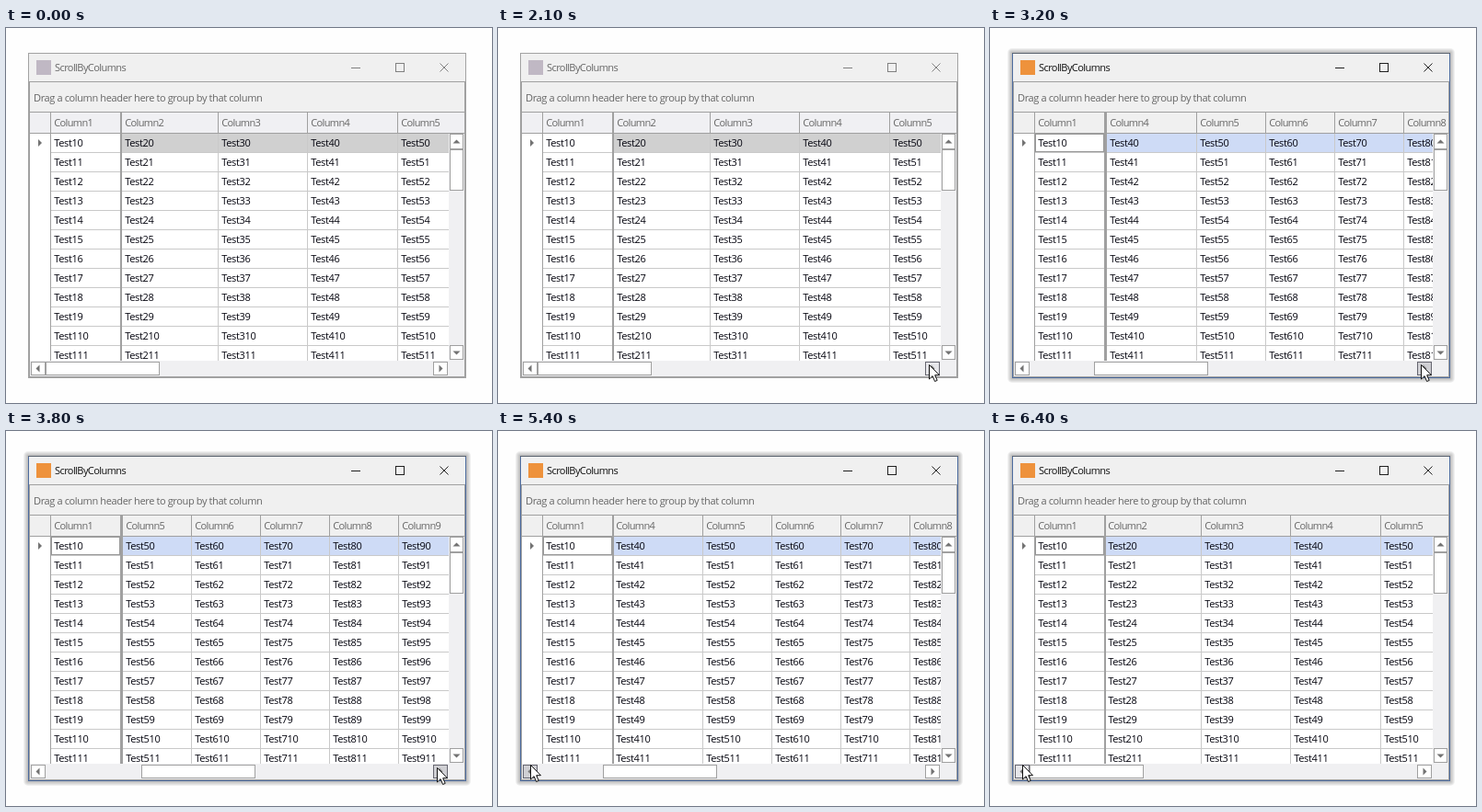
Animation, 528 px wide and 408 px high, one loop 8 s. Source, as an HTML page:

```html
<!DOCTYPE html>
<html lang="en">
<head>
<meta charset="utf-8">
<title>ScrollByColumns</title>
<style>
html, body { margin: 0; width: 100%; height: 100%; overflow: hidden; background: #fefefe; }
svg { display: block; }
text { font: 11px "Open Sans", "Noto Sans", sans-serif; white-space: pre; }
.cell { letter-spacing: -.3px; fill: #05050f; }
.head { letter-spacing: -.63px; fill: #666; }
.hint { letter-spacing: -.37px; fill: #666; }
.title { letter-spacing: -.57px; }
</style>
</head>
<body>
<svg id="stage" width="528" height="408" viewBox="0 0 528 408"></svg>
<script>
const LOOP = 8000, STEP = 100;
const LINE = '#a0a0a0', GRID = '#c9c9c9', FACE = '#f0f0f0';
const RIGHT_BUTTON = [468, 366], LEFT_BUTTON = [35, 363];

// time, first scrolled column, its left edge, thumb x, width of the fixed divider
const scrolls = [
  [0, 2, 125, 43, 2],
  [2600, 3, 126, 79, 3],
  [3200, 4, 126, 113, 3],
  [3800, 5, 126, 147, 3],
  [5400, 4, 124, 114, 2],
  [5900, 3, 124, 80, 2],
  [6300, 2, 124, 43, 2]
];

const stage = document.getElementById('stage');
const range = n => [...Array(n).keys()];
const colWidth = c => ({ 2: 105, 3: 97, 4: 98 })[c] || 75;

const rect = (x, y, w, h, fill) =>
  `<rect x="${x}" y="${y}" width="${w}" height="${h}" fill="${fill}"/>`;
const frame = (x, y, w, h, fill, stroke, extra = '') =>
  `<rect x="${x + .5}" y="${y + .5}" width="${w - 1}" height="${h - 1}" fill="${fill}" stroke="${stroke}" ${extra}/>`;
const path = (d, fill, stroke = 'none') => `<path d="${d}" fill="${fill}" stroke="${stroke}"/>`;
const label = (x, y, str, cls, fill) =>
  `<text x="${x}" y="${y}" class="${cls}"${fill ? ` style="fill:${fill}"` : ''}>${str}</text>`;

function ease(p) {
  const k = 2.6;
  return p < .5 ? Math.pow(2 * p, k) / 2 : 1 - Math.pow(2 - 2 * p, k) / 2;
}

function glide(a, b, p) {
  const e = ease(Math.max(0, Math.min(1, p)));
  return a.map((v, i) => Math.round(v + (b[i] - v) * e));
}

function pointerAt(t) {
  if (t < 1100) return null;
  if (t < 4200) return glide([15, 266], RIGHT_BUTTON, (t - 1100) / 900);
  return glide(RIGHT_BUTTON, LEFT_BUTTON, (t - 4100) / 900);
}

function shadow() {
  return range(5).map(i => {
    const d = 5 - i;
    return `<rect x="${24 - d}" y="${27 - d}" width="${476 + 2 * d}" height="${354 + 2 * d}" rx="${d}" opacity=".055"/>`;
  }).join('');
}

function windowFrame(active) {
  const ink = active ? '#202020' : '#808080';
  let s = active ? shadow() : '';
  s += frame(24, 27, 476, 354, FACE, active ? '#4d6c9f' : '#a2a2a2');
  if (active) s += rect(24, 27, 476, 1, '#5c6470');
  s += rect(33, 35, 16, 16, active ? '#ee923c' : '#c0b8c4');
  s += label(53, 47, 'ScrollByColumns', 'title', active ? '#101010' : '#666');
  s += rect(375, 43, 10, 1, ink) + frame(423, 38, 10, 10, 'none', ink);
  s += path('M471.5 38.5l9 9m0-9l-9 9', 'none', ink);
  s += frame(25, 58, 474, 322, FACE, LINE);
  return s + label(30, 80, 'Drag a column header here to group by that column', 'hint');
}

function column(c, x, w) {
  let s = label(x + 4.2, 107, 'Column' + c, 'head');
  s += rect(x + w, 92, 1, 22, LINE);
  s += '<g clip-path="url(#body)">' + rect(x + w, 115, 1, 247, GRID);
  s += range(12).map(r => label(x + 4.2, 129 + 21 * r, 'Test' + c + r, 'cell')).join('');
  return s + '</g>';
}

function grid(active, first, left, divider) {
  let s = rect(26, 91, 472, 1, LINE) + rect(26, 92, 472, 22, active ? FACE : '#f0f0f3');
  s += rect(26, 114, 472, 1, LINE) + rect(26, 115, 455, 247, '#fff');
  s += rect(126, 115, 355, 20, active ? '#cedbf6' : '#d0d0d0');
  s += range(11).map(r => rect(49, 135 + 21 * r, 432, 1, GRID)).join('');
  s += rect(48, 92, 1, 270, LINE);
  s += column(1, 48, 76);
  s += '<g clip-path="url(#scrolled)">';
  for (let c = first, x = left; x < 498; x += colWidth(c++)) s += column(c, x, colWidth(c));
  s += '</g>' + rect(124, 92, divider, 270, LINE);
  if (active) s += frame(49, 115, 75, 20, 'none', '#303030', 'stroke-dasharray="1 1"');
  return s + path('M35 121l4 4-4 4z', '#737373');
}

function button(x, y, w, h, arrow, state = 0) {
  const fill = ['#fff', '#e6e6ea', '#cfcfd3'][state];
  return frame(x, y, w, h, fill, state ? '#666670' : LINE) + path(arrow, '#737373');
}

function scrollBars(thumb, hover, pressed) {
  const state = side => hover === side ? (pressed ? 2 : 1) : 0;
  let s = rect(481, 115, 17, 247, '#f0f0f2') + rect(26, 362, 472, 17, '#f0f0f2');
  s += button(482, 115, 15, 17, 'M485.5 125.5l4-4 4 4z');
  s += frame(482, 132, 15, 45, '#fff', LINE);
  s += button(482, 345, 15, 16, 'M485.5 351.5h8l-4 4z');
  s += frame(thumb, 363, 124, 15, '#fff', LINE);
  s += button(27, 363, 16, 15, 'M36.5 366.5v8l-4-4z', state('left'));
  return s + button(464, 363, 16, 15, 'M470.5 366.5v8l4-4z', state('right'));
}

function pointer([x, y]) {
  const d = `M${x + .5} ${y + .5}v15.5l3.6-3.4 2.5 5.9 2.6-1.1-2.5-5.7h4.8z`;
  return path(d, '#fff', '#111');
}

const defs = `<defs>
<clipPath id="body"><rect x="26" y="115" width="455" height="247"/></clipPath>
<clipPath id="scrolled"><rect x="125" y="92" width="373" height="270"/></clipPath>
</defs>`;

function draw(t) {
  const active = t >= 2600;
  const [since, first, left, thumb, divider] = scrolls.filter(s => s[0] <= t).pop();
  const pressed = since > 0 && t < since + STEP;
  const hover = t >= 4900 ? 'left' : t >= 2000 && t < 4200 ? 'right' : '';
  const at = pointerAt(t);
  stage.innerHTML = defs + windowFrame(active) + grid(active, first, left, divider) +
    scrollBars(thumb, hover, pressed) + (at ? pointer(at) : '');
}

const start = performance.now();
let shown = -1;

function tick(now) {
  const t = Math.floor(Math.max(0, now - start) % LOOP / STEP) * STEP;
  if (t !== shown) draw(shown = t);
  requestAnimationFrame(tick);
}

tick(start);
</script>
</body>
</html>
```
